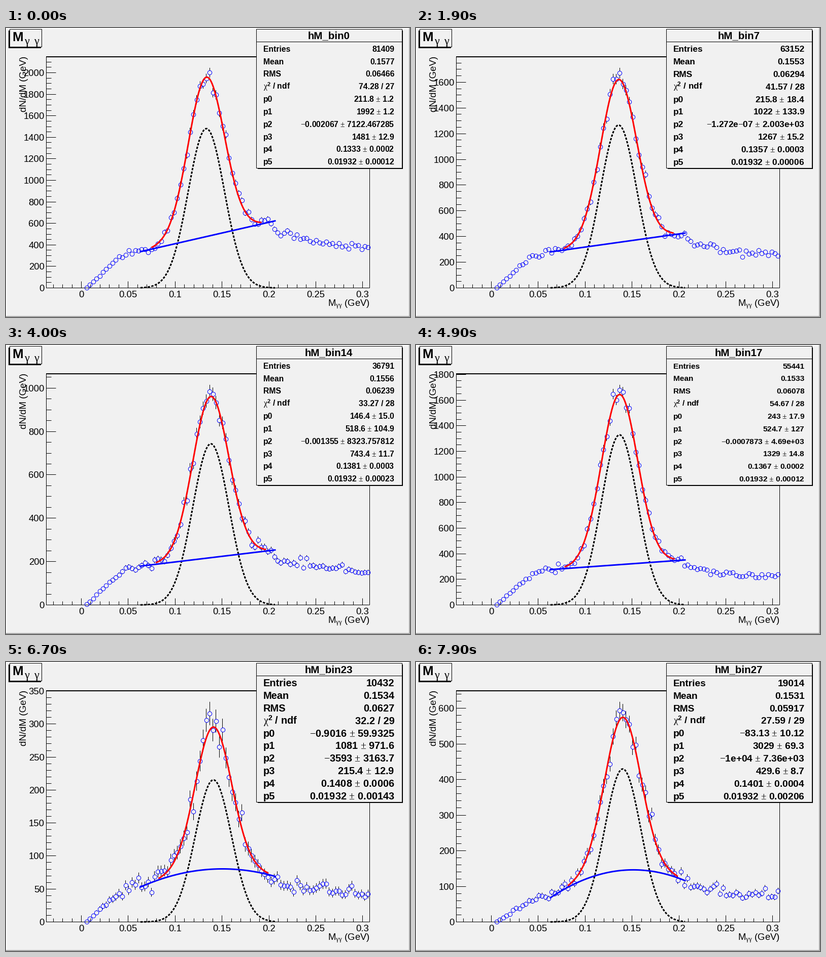
A matplotlib script that plays this animation: 796x572 px, repeating every 8000 ms.

```python
import numpy as np
import matplotlib.pyplot as plt
from matplotlib.animation import FuncAnimation
from matplotlib.collections import LineCollection
from matplotlib.patches import Rectangle

W, H, DPI = 796, 572, 64
PX = 72 / DPI                      # points per pixel
LEFT, RIGHT, TOP, BOTTOM = 79.5, 716.5, 57, 514.5
X_ZERO, X_SCALE = 148.5, 1847.5    # mass axis: pixel of zero, pixels per GeV
PAPER = "#f1f1f1"

plt.rcParams.update({
    "font.family": "Liberation Sans",
    "mathtext.fontset": "custom",
    "mathtext.default": "rm",
    "mathtext.rm": "Liberation Serif",
    "mathtext.it": "Liberation Serif",
    "mathtext.bf": "Liberation Sans:bold",
    "path.snap": False,            # pixel centres are given explicitly
})

BINS = np.arange(12, 100)
BIN_PX = LEFT + (RIGHT - LEFT) / 100 * (BINS + 0.5)
MASS = (BIN_PX - X_ZERO) / X_SCALE
TALLEST = 50 - BINS[0]

# histogram number: (stat font size, axis maximum, stat box text)
KNOWN = {
    0: (15.7, 2148, "81409; 0.1577; 0.06466; 74.28 / 27; 211.8 ± 1.2; "
        "1992 ± 1.2; -0.002067 ± 7122.467285; 1481 ± 12.9; "
        "0.1333 ± 0.0002; 0.01932 ± 0.00012"),
    7: (17.2, 1798, "63152; 0.1553; 0.06294; 41.57 / 28; 215.8 ± 18.4; "
        "1022 ± 133.9; -1.272e-07 ± 2.003e+03; 1267 ± 15.2; "
        "0.1357 ± 0.0003; 0.01932 ± 0.00006"),
    10: (20, 480, "13282; 0.1519; 0.05993; 45.5 / 29; 41.09 ± 9.68; "
         "298.7 ± 61.5; -0.5323 ± 50.6155; 310.1 ± 7.3; "
         "0.1394 ± 0.0005; 0.02016 ± 0.00063"),
    14: (15.7, 1066, "36791; 0.1556; 0.06239; 33.27 / 28; 146.4 ± 15.0; "
         "518.6 ± 104.9; -0.001355 ± 8323.757812; 743.4 ± 11.7; "
         "0.1381 ± 0.0003; 0.01932 ± 0.00023"),
    19: (15.1, 2298, "67874; 0.1518; 0.05971; 68.93 / 28; 307.4 ± 19.8; "
         "528.7 ± 141.4; -0.0004088 ± 2259.6726074; 1720 ± 16.9; "
         "0.1357 ± 0.0002; 0.01932 ± 0.00005"),
    23: (20, 350.4, "10432; 0.1534; 0.0627; 32.2 / 29; -0.9016 ± 59.9325; "
         "1081 ± 971.6; -3593 ± 3163.7; 215.4 ± 12.9; "
         "0.1408 ± 0.0006; 0.01932 ± 0.00143"),
    27: (19.1, 649, "19014; 0.1531; 0.05917; 27.59 / 29; -83.13 ± 10.12; "
         "3029 ± 69.3; -1e+04 ± 7.36e+03; 429.6 ± 8.7; "
         "0.1401 ± 0.0004; 0.01932 ± 0.00206"),
}
FORMATS = (["{:.0f}", "{:.4g}", "{:.4g}", "{:.4g} / {:.0f}"]
           + ["{:.4g} ± {:.3g}"] * 4 + ["{:.4f} ± {:.4f}", "{:.5f} ± {:.5f}"])


def numbers(line):
    return np.array([float(s) for s in line.replace("/", "±").split("±")])


def histogram(index):
    """Font size, axis maximum and stat lines, blended between known ones."""
    lo = max(k for k in KNOWN if k <= index)
    hi = min(k for k in KNOWN if k >= index)
    size, top, text = KNOWN[lo]
    stats = text.split("; ")
    if lo == hi:
        return size, top, stats
    t = (index - lo) / (hi - lo)
    next_size, next_top, next_text = KNOWN[hi]
    stats = [form.format(*(numbers(a) * (1 - t) + numbers(b) * t))
             for form, a, b in zip(FORMATS, stats, next_text.split("; "))]
    return size + (next_size - size) * t, top + (next_top - top) * t, stats


def fit_parts(stats):
    p0, p1, p2, height, mean, sigma = [numbers(s)[0] for s in stats[4:]]

    def line(x):
        return p0 + p1 * x + p2 * x * x

    def gauss(x):
        return height * np.exp(-0.5 * ((x - mean) / sigma) ** 2)

    return line, gauss, mean, sigma


def counts(index, top, line, gauss):
    """Rising edge, fitted peak and falling tail with counting noise."""
    start, end = 0.066, 0.203
    rise = np.sin(np.pi / 2 * np.clip((MASS - 0.005) / 0.063, 0, 1)) ** 1.1
    fall = 0.6 + 0.32 * np.exp((end - MASS) / 0.04)
    n = np.where(MASS < start, 1.05 * line(start) * rise,
                 np.where(MASS > end, line(end) * fall,
                          line(MASS) + gauss(MASS)))
    rng = np.random.default_rng(100 + index)
    n = n + 0.9 * rise * rng.normal(size=n.size) * np.sqrt(n)
    # the tallest point and its error bar leave 5 % headroom
    tallest = (np.sqrt(top / 1.05 + 0.25) - 0.5) ** 2
    n = np.clip(n, 0, 0.99 * tallest)
    n[TALLEST] = tallest
    return n


def tick_step(top):
    """Round major step; the division count grows until the axis is filled."""
    wanted = 10
    while True:
        rough = top / wanted
        power = 10 ** np.floor(np.log10(rough))
        mantissa = next(m for m in (1, 2, 5, 10) if rough / power <= m + 1e-9)
        step = mantissa * power
        if 2 * (int(top / step) + 1) > wanted:
            return step, 4 if mantissa == 2 else 5
        wanted += 1


fig = plt.figure(figsize=(W / DPI, H / DPI), dpi=DPI, facecolor=PAPER)
ax = fig.add_axes([0, 0, 1, 1])
ax.set_xlim(0, W)
ax.set_ylim(H, 0)
ax.axis("off")


def box(x0, y0, x1, y1, color, edge="none", z=1):
    ax.add_patch(Rectangle((x0, y0), x1 - x0, y1 - y0, facecolor=color,
                           edgecolor=edge, linewidth=PX, zorder=z))


def label(x, y, text="", size=18.5, ha="left", z=6, **style):
    return ax.text(x, y, text, fontsize=size * PX, ha=ha, va="baseline",
                   zorder=z, **style)


def stroke(color, width, z, **style):
    return ax.plot([], [], color=color, lw=width * PX, zorder=z, **style)[0]


def segments(z, lines=()):
    return ax.add_collection(LineCollection(
        list(lines), colors="black", linewidths=PX, zorder=z), autolim=False)


# canvas bevel
box(0, 0, W, 2, "white")
box(0, 0, 2, H, "white")
box(W - 2, 0, W, H, "#a8a8a8")
box(0, H - 2, W, H, "#a8a8a8")

# plot frame and mass axis
box(LEFT - 0.5, 56, RIGHT + 0.5, 58, "black", z=2)
segments(2, [[(LEFT, TOP), (LEFT, BOTTOM)], [(RIGHT, TOP), (RIGHT, BOTTOM)],
             [(LEFT, BOTTOM), (RIGHT, BOTTOM)]])
mass_ticks = []
for i in range(-3, 31):
    x = np.floor(X_ZERO + X_SCALE * i / 100) + 0.5
    mass_ticks.append([(x, BOTTOM), (x, BOTTOM - (13 if i % 5 == 0 else 7))])
    if i >= 0 and i % 5 == 0:
        label(x, 533, f"{i / 100:g}", ha="center")
segments(2, mass_ticks)
label(717, 550, r"M$_{\gamma\gamma}$ (GeV)", ha="right")
ax.text(36, 56, "dN/dM (GeV)", fontsize=18.7 * PX, rotation=90,
        ha="center", va="top", zorder=6)

# title box
box(5, 5, 69, 40, "black", z=4)
box(7.5, 2.5, 70.5, 37.5, PAPER, "black", z=5)
label(12, 26, "M", 26, weight="bold")
for x in (36, 55):
    label(x, 32, "γ", 22, family="Liberation Serif")

# stat box
box(496, 5, 782, 279, "black", z=4)
box(493.5, 2.5, 780.5, 277.5, PAPER, "black", z=5)
segments(6, [[(494, 27.5), (780, 27.5)]])
heading = label(636, 21, size=20.5, ha="center", weight="bold")
row_names = ["Entries", "Mean", "RMS", r"$\chi^{\mathbf{2}}$ / ndf"]
row_names += [f"p{i}" for i in range(6)]
names = [label(507, 0, name, weight="bold") for name in row_names]
values = [label(765.5, 0, ha="right", weight="bold") for _ in row_names]

# moving parts
bars = segments(3)
points = stroke("blue", 1, 3, ls="none", marker="o", ms=8.4 * PX,
                mfc="none", mec="blue", mew=PX)
total_curve = stroke("red", 3, 3.2)
gauss_curve = stroke("black", 3, 3.3, dashes=(1.5, 0.9),
                     dash_capstyle="butt")
line_curve = stroke("blue", 3, 3.4)
count_ticks = segments(2)
count_labels = [label(75.5, 0, ha="right") for _ in range(16)]


def draw_axis(top, to_px):
    step, parts = tick_step(top)
    lines = []
    for text in count_labels:
        text.set_text("")
    for i in range(int(top / step * parts + 1e-6) + 1):
        y = np.floor(to_px(i * step / parts)) + 0.5
        major = i % parts == 0
        lines.append([(LEFT, y), (LEFT + (19 if major else 10), y)])
        if major:
            text = count_labels[i // parts]
            text.set_text(f"{i // parts * step:g}")
            text.set_y(y + 6.5)
    count_ticks.set_segments(lines)


def draw_stats(index, size, stats):
    heading.set_text(f"hM_bin{index}")
    for row, (name, value, line) in enumerate(zip(names, values, stats)):
        for text in (name, value):
            text.set_y(41 + 24.85 * row + 0.36 * size)
            text.set_fontsize(size * PX)
        value.set_text(line.replace("-", "$-$").replace("±", r"$\pm$"))


def update(frame):
    index = (frame + 2) // 3
    size, top, stats = histogram(index)
    line, gauss, mean, sigma = fit_parts(stats)
    n = counts(index, top, line, gauss)
    scale = (BOTTOM - TOP) / top

    def to_px(value):
        return BOTTOM - value * scale

    draw_axis(top, to_px)
    draw_stats(index, size, stats)

    points.set_data(BIN_PX, to_px(n))
    lines = []
    for x, y, e in zip(np.floor(BIN_PX) + 0.5, to_px(n), np.sqrt(n) * scale):
        if e > 4:
            lines += [[(x, y - e), (x, y - 4)], [(x, y + 4), (x, y + e)]]
    bars.set_segments(lines)

    wide = np.linspace(0.063, 0.2065, 120)
    near = np.linspace(mean - 3 * sigma, mean + 3 * sigma, 120)
    for curve, x, y in ((total_curve, near, line(near) + gauss(near)),
                        (gauss_curve, wide, gauss(wide)),
                        (line_curve, wide, line(wide))):
        curve.set_data(X_ZERO + X_SCALE * x, to_px(y))
    return []


anim = FuncAnimation(fig, update, frames=80, interval=100, repeat=True,
                     repeat_delay=0, init_func=lambda: update(0), blit=False)
plt.show()
```
